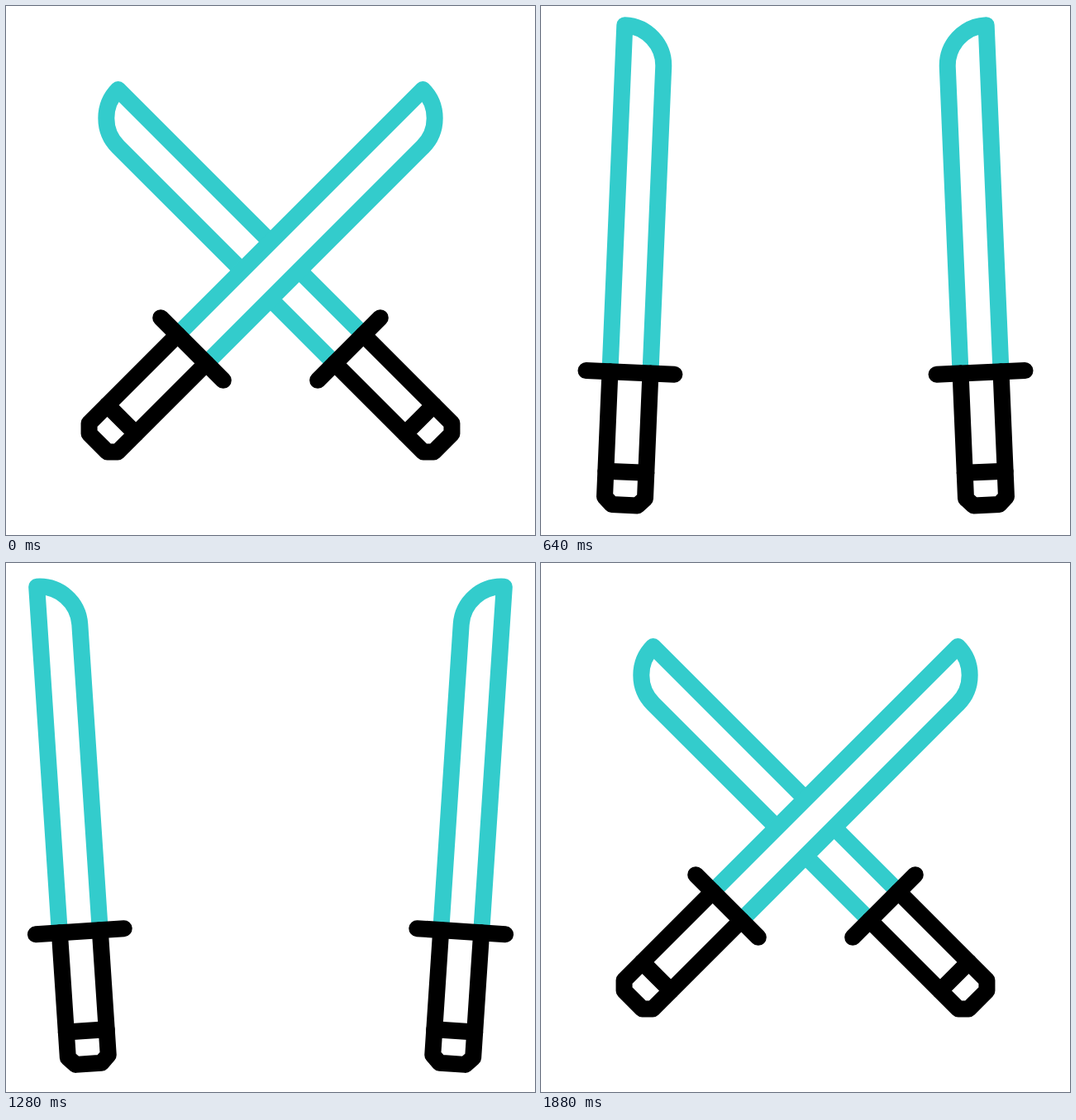
These frames come from a looping animation (640 px wide and 640 px high, 2000 ms). An HTML page:

```html
<!DOCTYPE html>
<html lang="en">
<head>
<meta charset="utf-8">
<title>Crossed swords</title>
<style>
  html, body { margin: 0; width: 100%; height: 100%; overflow: hidden; background: #fff; }
  svg { display: block; width: 100%; height: 100%; }
</style>
</head>
<body>
<svg viewBox="0 0 640 640">
  <defs>
    <!-- Upright sword, origin at the middle of the guard -->
    <g id="sword" fill="none" stroke-width="20" stroke-linejoin="round">
      <path d="M-24.5 0V-419.5A49 49 0 0 1 24.5 -370.5V0" fill="#fff" stroke="#3cc"/>
      <g stroke="#000" stroke-linecap="round">
        <path d="M-24.5 0V151.5L-15.5 160.5H15.5L24.5 151.5V0" fill="#fff"/>
        <path d="M-24.5 120.5H24.5M-53.5 0H53.5"/>
      </g>
    </g>
  </defs>
  <g transform="translate(640 0) scale(-1 1)"><use class="blade" href="#sword"/></g>
  <use class="blade" href="#sword"/>
</svg>
<script>
  const LOOP = 2000, STEP = 40;
  const CROSSED = 45, WIDE = -5.1;
  const PIVOT = 171; // end of the grip, below the guard
  const swords = document.querySelectorAll('.blade');

  const clamp = v => Math.min(1, Math.max(0, v));
  const mix = (a, b, u) => a + (b - a) * u;
  const span = (t, from, to) => clamp((t - from) / (to - from));

  // Cubic Bezier easing with flat ends: (x1, 0, x2, 1)
  function ease(x, x1, x2) {
    let lo = 0, hi = 1;
    for (let i = 0; i < 30; i++) {
      const m = (lo + hi) / 2, n = 1 - m;
      const bx = 3 * x1 * n * n * m + 3 * x2 * n * m * m + m * m * m;
      if (bx < x) lo = m; else hi = m;
    }
    return lo * lo * (3 - 2 * lo);
  }

  // Angle of the sword and how far its grip has dropped (0 crossed, 1 apart)
  function pose(t) {
    if (t < 1000) {
      const u = span(t, 200, 840);
      return [mix(CROSSED, 0, ease(u, 0.445, 0.1)), ease(u, 0.416, 0.084)];
    }
    if (t < 1200) return [mix(0, WIDE, ease(span(t, 1000, 1200), 0.4, 0.6)), 1];
    const u = ease(span(t, 1200, 1560), 0.851, 0.779);
    return [mix(WIDE, CROSSED, u), 1 - u];
  }

  function draw(t) {
    const [angle, drop] = pose(t);
    const x = mix(104.1, 100.5, drop), y = mix(535.9, 618.5, drop);
    const move = `translate(${x} ${y}) rotate(${angle}) translate(0 ${-PIVOT})`;
    swords.forEach(s => s.setAttribute('transform', move));
  }

  const start = performance.now();
  function tick() {
    const t = (performance.now() - start) % LOOP;
    draw(Math.floor(t / STEP) * STEP);
    requestAnimationFrame(tick);
  }
  tick();
</script>
</body>
</html>
```
